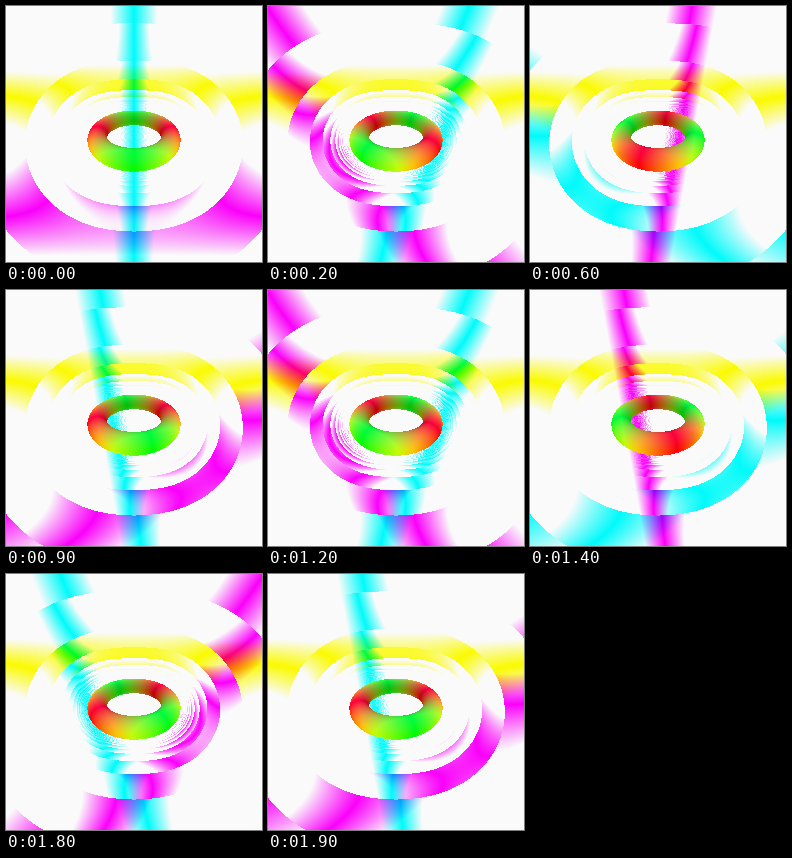
These frames come from a looping animation (256 by 256 pixels, 2000 ms). An HTML page with a canvas:

```html
<!DOCTYPE html>
<html lang="en">
<head>
<meta charset="utf-8">
<title>Ray-marched torus</title>
<style>
  html, body { margin: 0; width: 100%; height: 100%; overflow: hidden; background: #fafafa; }
  canvas { display: block; width: 100vw; height: 100vh; image-rendering: pixelated; }
</style>
</head>
<body>
<canvas id="stage" width="256" height="256"></canvas>
<script>
const SIZE = 256;
const STEP_MS = 100;
const POSES = 10;
const CAMERA = [0, 2, 3];
const MAJOR = 1, MINOR = 0.25;
const BOUND = 5, MAX_STEPS = 100, HIT = 0.001;
const WHITE = 250;

const ctx = document.getElementById('stage').getContext('2d');
const image = ctx.createImageData(SIZE, SIZE);
const points = new Float32Array(SIZE * SIZE * 3);

const torus = (x, y, z) => Math.hypot(Math.hypot(x, z) - MAJOR, y) - MINOR;

// Marches one ray; returns where it hits the torus or leaves the bounding sphere.
function march(u, v) {
  const reach = Math.hypot(CAMERA[1], CAMERA[2]);
  const sin = CAMERA[1] / reach, cos = CAMERA[2] / reach;
  const norm = Math.hypot(u, v, 1);
  const dx = u / norm;
  const dy = (v * cos - sin) / norm;
  const dz = (-cos - v * sin) / norm;
  let [x, y, z] = CAMERA;
  for (let i = 0; i < MAX_STEPS; i++) {
    const d = torus(x, y, z);
    if (d < HIT) break;
    x += dx * d;
    y += dy * d;
    z += dz * d;
    if (Math.hypot(x, y, z) > BOUND) break;
  }
  return [x, y, z];
}

// Pixel centre to the range -1..1.
const centred = pixel => (pixel + 0.5) * 2 / SIZE - 1;

for (let row = 0, i = 0; row < SIZE; row++) {
  for (let col = 0; col < SIZE; col++, i += 3) {
    points.set(march(centred(col), -centred(row)), i);
  }
}

const level = value => Math.min(WHITE, Math.abs(value) * 255);

// Each colour channel is the distance from one plane of the turning axes.
function paint(pose) {
  const angle = pose * Math.PI / POSES;
  const c = Math.cos(angle), s = Math.sin(angle);
  const data = image.data;
  for (let i = 0, o = 0; i < points.length; i += 3, o += 4) {
    const x = points[i], y = points[i + 1], z = points[i + 2];
    data[o] = level(x * c + z * s);
    data[o + 1] = level(z * c - x * s);
    data[o + 2] = level(y);
    data[o + 3] = 255;
  }
  ctx.putImageData(image, 0, 0);
}

let shown = -1;
const start = performance.now();
function tick() {
  const pose = Math.floor((performance.now() - start) / STEP_MS) % POSES;
  if (pose !== shown) paint(shown = pose);
  requestAnimationFrame(tick);
}
tick();
</script>
</body>
</html>
```
